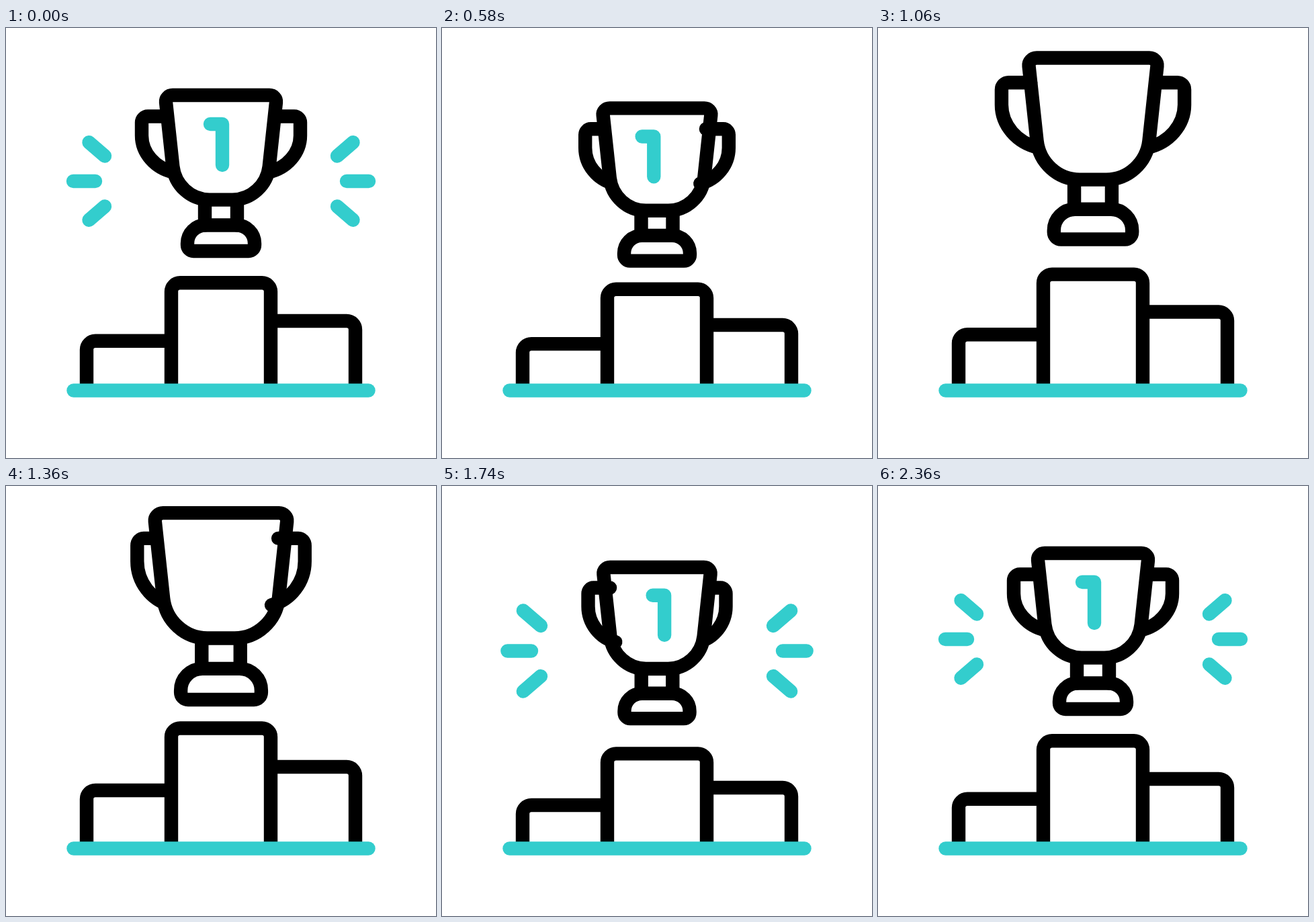
Recreate the animation shown at these times as an HTML page with a canvas. Size 640 by 640 pixels, loop 2740 ms.

```html
<!DOCTYPE html>
<html lang="en">
<head>
<meta charset="utf-8">
<title>Trophy</title>
<style>
  html, body { margin: 0; width: 100%; height: 100%; overflow: hidden; background: #fff; }
  canvas { display: block; width: 100vw; height: 100vh; }
</style>
</head>
<body>
<canvas id="stage"></canvas>
<script>
const SIZE = 640, LOOP = 2740, STEP = 20, LINE = 20.4;
const BLACK = '#000', TEAL = '#33cdcd';
const canvas = document.getElementById('stage');
const ctx = canvas.getContext('2d');
const dpr = window.devicePixelRatio || 1;
canvas.width = canvas.height = SIZE * dpr;

// Eased progress from 0 at time a to 1 at time b
const span = (t, a, b) => (1 - Math.cos(Math.PI * Math.min(1, Math.max(0, (t - a) / (b - a))))) / 2;

// Every part dips, rises, lands, rebounds and settles; only the amounts and the rise differ
function bounce({ rest = 1, dip, peak, land, rebound, dipEnd = 440, rise = 440, top = 1280 }) {
  return t => rest
    + (dip - rest) * span(t, 200, dipEnd)
    + (peak - dip) * span(t, rise, top)
    + (land - peak) * span(t, 1320, 1780)
    + (rebound - land) * span(t, 1780, 1920)
    + (rest - rebound) * span(t, 1920, 2300);
}

const lift = bounce({ rest: 0, dip: 23, peak: -38, land: 18.6, rebound: -11.6, top: 1130 });
const zoom = bounce({ dip: 0.9635, peak: 1.202, land: 0.966, rebound: 1.021 });
const middle = bounce({ dip: 0.941, peak: 1.1215, land: 0.8765, rebound: 1.042, rise: 600 });
const sides = bounce({ dip: 0.941, peak: 1.1785, land: 0.87, rebound: 1.045, rise: 550 });
const rays = bounce({ dip: 0, peak: 0, land: 1.1, rebound: 0.81, dipEnd: 320 });
const turn = t => Math.PI * (span(t, 407, 1160) + span(t, 1160, 1934));

// Trophy parts, measured from the trophy's centre at (320, 216)
const CUP = new Path2D('M-72-116H72C78-116 82.6-111 82-105.5L71.7-10C68.5 18 45 39.6 17 39.6H-17'
  + 'C-45 39.6-68.5 18-71.7-10L-82-105.5C-82.6-111-78-116-72-116Z');
const STEM = new Path2D('M-24 39V77.5M24 39V77.5');
const BASE = new Path2D('M-50 104.5C-50 89.5-38 77.5-23 77.5H23C38 77.5 50 89.5 50 104.5V107'
  + 'A9 9 0 0 1 41 116H-41A9 9 0 0 1-50 107Z');
const HANDLE = new Path2D('M80.5-84.5H109A9 9 0 0 1 118-75.5V-56C118-30 98-7.5 71-1.5');
const ONE = new Path2D('M-16-73H2V-12');

function place(path, sx, sy, x, y) {
  const placed = new Path2D();
  placed.addPath(path, new DOMMatrix([sx, 0, 0, sy, x, y]));
  return placed;
}

function stroke(path, color) {
  ctx.strokeStyle = color;
  ctx.stroke(path);
}

function drawTrophy(t) {
  const s = zoom(t), y = 216 + lift(t), angle = turn(t);
  const part = (path, sx = s, x = 320) => place(path, sx, s, x, y);
  const facing = Math.cos(angle), depth = Math.sin(angle);
  const handle = side => stroke(part(HANDLE, s * facing * side), BLACK);
  const front = depth >= 0 ? 1 : -1;
  const still = Math.abs(depth) < 1e-4;
  const cup = part(CUP);

  handle(-front);
  if (still) handle(front);
  stroke(part(STEM), BLACK);
  stroke(part(BASE), BLACK);
  ctx.fillStyle = '#fff';
  ctx.fill(cup);
  if (facing > 0) {
    ctx.save();
    ctx.clip(cup);
    const slide = -front * 90 * (1 - facing);
    stroke(part(ONE, s, 320 + slide * s), TEAL);
    ctx.restore();
  }
  stroke(cup, BLACK);
  if (!still) handle(front);
}

function drawRays(t) {
  const k = rays(t), y = 228 + lift(t);
  if (k < 0.03) return;
  const path = new Path2D();
  for (const side of [-1, 1]) {
    for (const row of [-1, 0, 1]) {
      const x = 320 + side * (row ? 173 : 187), top = y + row * 37.5;
      const grow = row ? k ** 1.4 : k;
      path.moveTo(x, top);
      path.lineTo(x + side * grow * (row ? 23.5 : 33), top + row * grow * 20.3);
    }
  }
  stroke(path, TEAL);
}

function drawPodium(t) {
  const m = 540 - 160.7 * middle(t), a = sides(t);
  const left = 540 - 74.2 * a, right = 540 - 104 * a;
  ctx.lineCap = 'butt';
  stroke(new Path2D(`M120 538V${left + 13}a13 13 0 0 1 13-13H246`), BLACK);
  stroke(new Path2D(`M246 538V${m + 13}a13 13 0 0 1 13-13H381a13 13 0 0 1 13 13V538`), BLACK);
  stroke(new Path2D(`M394 ${right}H507a13 13 0 0 1 13 13V538`), BLACK);
  ctx.lineCap = 'round';
  stroke(new Path2D('M100.5 539.5H539.5'), TEAL);
}

function draw(t) {
  ctx.setTransform(dpr, 0, 0, dpr, 0, 0);
  ctx.fillStyle = '#fff';
  ctx.fillRect(0, 0, SIZE, SIZE);
  ctx.lineWidth = LINE;
  ctx.lineCap = ctx.lineJoin = 'round';
  drawPodium(t);
  drawRays(t);
  drawTrophy(t);
}

const start = performance.now();
function tick() {
  const t = (performance.now() - start) % LOOP;
  draw(Math.floor(t / STEP) * STEP);
  requestAnimationFrame(tick);
}
tick();
</script>
</body>
</html>
```
